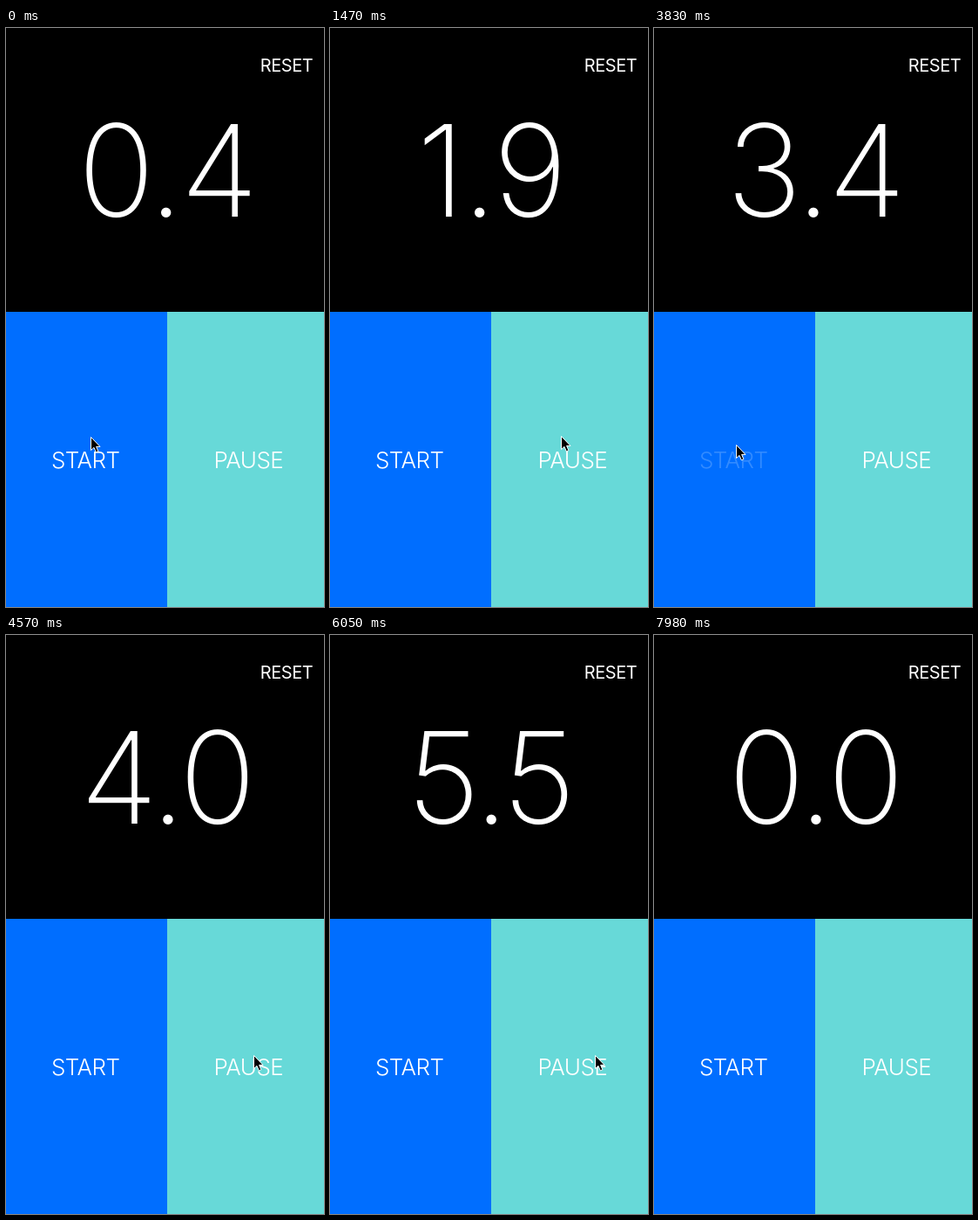
Write an HTML page that moves like this. It is 365x663 px and loops after 8 s.

```html
<!DOCTYPE html>
<html lang="en">
<head>
<meta charset="utf-8">
<title>Stopwatch</title>
<style>
  html, body { margin: 0; width: 100%; height: 100%; overflow: hidden; background: #000; }
  svg { display: block; width: 365px; height: 663px; }
  text { font-family: Inter, "Open Sans", sans-serif; fill: #fff; text-anchor: middle; }
  #time { font-size: 146px; font-weight: 200; }
  .button { font-size: 26px; font-weight: 300; letter-spacing: -.02em; }
  .small { font-size: 20px; font-weight: 400; }
</style>
</head>
<body>
<svg viewBox="0 0 365 663">
  <rect width="365" height="663"/>
  <rect y="325" width="185" height="338" fill="#006eff"/>
  <rect x="185" y="325" width="180" height="338" fill="#67d9d8"/>
  <text id="time" x="186" y="216">0.0</text>
  <text id="reset" class="button small" x="322" y="50">RESET</text>
  <text id="start" class="button" x="91.2" y="503.5">START</text>
  <text id="pause" class="button" x="278.4" y="503.5">PAUSE</text>
  <path id="cursor" d="M.5 .5V15.6L4 12.4L6.3 17.8L8.9 16.7L6.6 11.4H11Z"
        stroke="#fff" stroke-width="1" stroke-linejoin="round"/>
</svg>
<script>
const LOOP = 8000, STEP = 147.6, DIM = 0.2, FADE = 380;
const DIGIT_PITCH = 114, CENTER = 186;

const $ = id => document.getElementById(id);
const time = $('time'), cursor = $('cursor');

// [button, touch down, touch up]
const presses = [
  ['pause', 2870, 2990],
  ['start', 3750, 3880],
  ['pause', 6340, 6450],
  ['reset', 7490, 7590]
];

// [time, x, y]
const cursorPath = [
  [0, 97, 468], [300, 97, 468],
  [950, 265, 467], [3150, 265, 467],
  [3530, 94, 477], [4050, 94, 477],
  [4700, 304, 481], [6620, 304, 481],
  [7220, 350, -24], [LOOP, 350, -24]
];

const ease = p => p * p * (3 - 2 * p);

// Tighten the digits so that two of them around the point keep an even pitch.
function spaceDigits() {
  const pair = time.getComputedTextLength();
  time.textContent = '0';
  const gap = (DIGIT_PITCH - (pair - time.getComputedTextLength())) / 2;
  time.style.letterSpacing = gap + 'px';
  time.setAttribute('x', CENTER + gap / 2);
}

function elapsed(t) {
  if (t < 2990) return t + 470;
  if (t < 3880) return 3400;
  if (t < 7590) return Math.min(t, 6450) - 480;
  return 0;
}

function cursorAt(t) {
  const i = cursorPath.findIndex(point => point[0] > t);
  const [t0, x0, y0] = cursorPath[i - 1], [t1, x1, y1] = cursorPath[i];
  const p = ease((t - t0) / (t1 - t0));
  return [x0 + (x1 - x0) * p, y0 + (y1 - y0) * p];
}

function opacityOf(button, t) {
  const press = presses.find(([id, down, up]) => id === button && t >= down && t < up + FADE);
  if (!press) return 1;
  const p = Math.max(0, (t - press[2]) / FADE);
  return DIM + (1 - DIM) * ease(p);
}

function render(t) {
  time.textContent = (Math.floor(elapsed(t) / 100) / 10).toFixed(1);
  for (const id of ['start', 'pause', 'reset']) $(id).style.opacity = opacityOf(id, t);
  cursor.setAttribute('transform', `translate(${cursorAt(t).map(Math.round)})`);
}

spaceDigits();
const began = performance.now();
function tick() {
  const t = (performance.now() - began) % LOOP;
  render(Math.floor((t + 10) / STEP) * STEP);
  requestAnimationFrame(tick);
}
tick();
</script>
</body>
</html>
```
